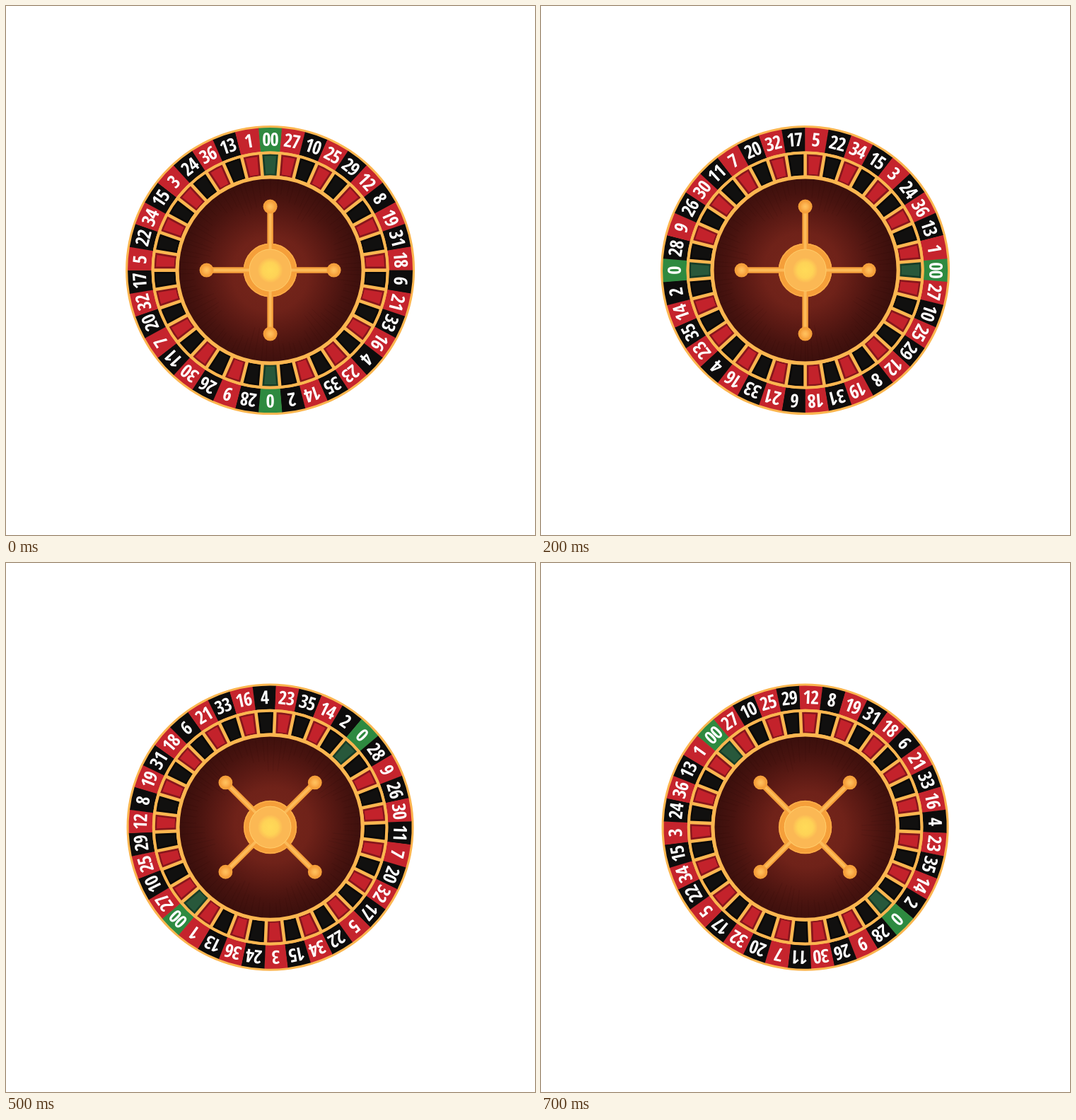
Recreate the animation shown at these times as an HTML page with a canvas. Size 748 by 748 pixels, loop 0.81 s.

```html
<!DOCTYPE html>
<html lang="en">
<head>
<meta charset="utf-8">
<title>Roulette wheel</title>
<style>
html, body { margin: 0; width: 100%; height: 100%; overflow: hidden; background: #fff; }
canvas { display: block; }
</style>
</head>
<body>
<canvas width="748" height="748"></canvas>
<script>
const ctx = document.querySelector('canvas').getContext('2d');
const TAU = Math.PI * 2;
const CENTER = 373.6;
const GOLD = '#fbb650', ORANGE = '#f59f3a';
const numbers = ('00 27 10 25 29 12 8 19 31 18 6 21 33 16 4 23 35 14 2 ' +
  '0 28 9 26 30 11 7 20 32 17 5 22 34 15 3 24 36 13 1').split(' ');
const pitch = TAU / numbers.length;
const palette = {
  green: { outer: '#2e8a40', inner: '#28583b', edge: '#173c27' },
  red: { outer: '#c5242d', inner: '#c3222b', edge: '#86161c' },
  black: { outer: '#0d0c0c', inner: '#11100f', edge: '#0a0908' }
};

function disc(x, y, r, fill) {
  ctx.beginPath();
  ctx.arc(x, y, r, 0, TAU);
  ctx.fillStyle = fill;
  ctx.fill();
}

function ring(r, width, color) {
  ctx.beginPath();
  ctx.arc(0, 0, r, 0, TAU);
  ctx.lineWidth = width;
  ctx.strokeStyle = color;
  ctx.stroke();
}

function line(x1, y1, x2, y2, width, color) {
  ctx.beginPath();
  ctx.moveTo(x1, y1);
  ctx.lineTo(x2, y2);
  ctx.lineWidth = width;
  ctx.strokeStyle = color;
  ctx.stroke();
}

// Sector centred on "up", narrowed by a constant gap on both sides.
function sector(r1, r2, gap, fill) {
  const up = -TAU / 4, a1 = pitch / 2 - gap / r1, a2 = pitch / 2 - gap / r2;
  ctx.beginPath();
  ctx.arc(0, 0, r2, up - a2, up + a2);
  ctx.arc(0, 0, r1, up + a1, up - a1, true);
  ctx.closePath();
  ctx.fillStyle = fill;
  ctx.fill();
}

function radial(x, y, r, ...stops) {
  const g = ctx.createRadialGradient(x, y, 0, x, y, r);
  stops.forEach(([at, color]) => g.addColorStop(at, color));
  return g;
}

// Choose the slimmest installed face and the size at which its digits fit a slot.
function pickFont() {
  const font = (size, name) => `600 extra-condensed ${size}px "${name}", sans-serif`;
  const faces = ['Roboto Condensed', 'Open Sans Condensed', 'Liberation Sans Narrow',
    'Noto Sans', 'Open Sans', 'Roboto'].map(name => {
    ctx.font = font(100, name);
    const m = ctx.measureText('00');
    return { name, w: m.width, h: m.actualBoundingBoxAscent };
  });
  const best = faces.reduce((a, b) => b.h / b.w > a.h / a.w ? b : a);
  return font(100 * Math.min(20.5 / best.h, 24.5 / best.w), best.name);
}

function drawPockets(font) {
  disc(0, 0, 204.5, GOLD);
  numbers.forEach((label, i) => {
    const c = palette[i % 19 === 0 ? 'green' : i % 2 ? 'red' : 'black'];
    ctx.save();
    ctx.rotate(i * pitch);
    sector(168, 201.5, -0.2, c.outer);
    sector(134, 164.5, 2.3, c.edge);
    sector(136, 161.5, 5, c.inner);
    ctx.font = font;
    ctx.letterSpacing = label.length > 1 ? '-1px' : '0px';
    ctx.textAlign = 'center';
    ctx.fillStyle = '#fff';
    const { actualBoundingBoxAscent: h } = ctx.measureText('0');
    ctx.fillText(label, 0, -185.3 + h / 2);
    ctx.restore();
  });
  ring(166, 4, GOLD);
}

function drawBowl() {
  disc(0, 0, 131, radial(0, 5, 134,
    [0, '#77271b'], [0.4, '#6f2219'], [0.6, '#5c1a14'], [0.8, '#48130f'], [1, '#3a0f0c']));
  // Faint streaks in the wood
  for (let i = 0; i < 90; i++) {
    const a = i * 2.39996, r = 78 + 30 * Math.abs(Math.sin(i * 7.3));
    const x = Math.cos(a), y = Math.sin(a);
    line(x * r, y * r, x * 128, y * 128, 1, 'rgba(25,4,3,.1)');
  }
  ring(131.5, 5, GOLD);
}

function drawHub() {
  disc(0, 0, 38, ORANGE);
  ring(37, 1.5, '#fbac48');
  for (let i = 0; i < 4; i++) {
    ctx.save();
    ctx.rotate(i * TAU / 4);
    line(0, -28, 0, -86, 8.5, ORANGE);
    line(0, -28, 0, -86, 4, '#fcba58');
    disc(0, -90, 10, radial(0, -90, 10, [0, '#ffc45d'], [0.35, '#fdb452'], [0.75, ORANGE], [1, ORANGE]));
    ctx.restore();
  }
  disc(0, 0, 30, '#fbb854');
  ring(29.5, 1, '#ffcb68');
  disc(0, 0, 18, radial(0, 0, 18, [0, '#ffda58'], [0.6, '#fed356'], [0.8, '#fdc655'], [1, '#fbb854']));
}

const digitFont = pickFont();

function draw(now) {
  const step = Math.min(7, Math.floor(now % 810 / 100));
  // The wheel is slightly smaller on the diagonals
  const size = step % 2 ? 0.993 : 1;
  ctx.setTransform(1, 0, 0, 1, 0, 0);
  ctx.fillStyle = '#fff';
  ctx.fillRect(0, 0, 748, 748);
  ctx.translate(CENTER, CENTER);
  ctx.rotate(step * TAU / 8);
  ctx.scale(size, size);
  drawPockets(digitFont);
  drawBowl();
  drawHub();
}

let start;
function tick(now) {
  start ??= now;
  draw(now - start);
  requestAnimationFrame(tick);
}
draw(0);
requestAnimationFrame(tick);
</script>
</body>
</html>
```
